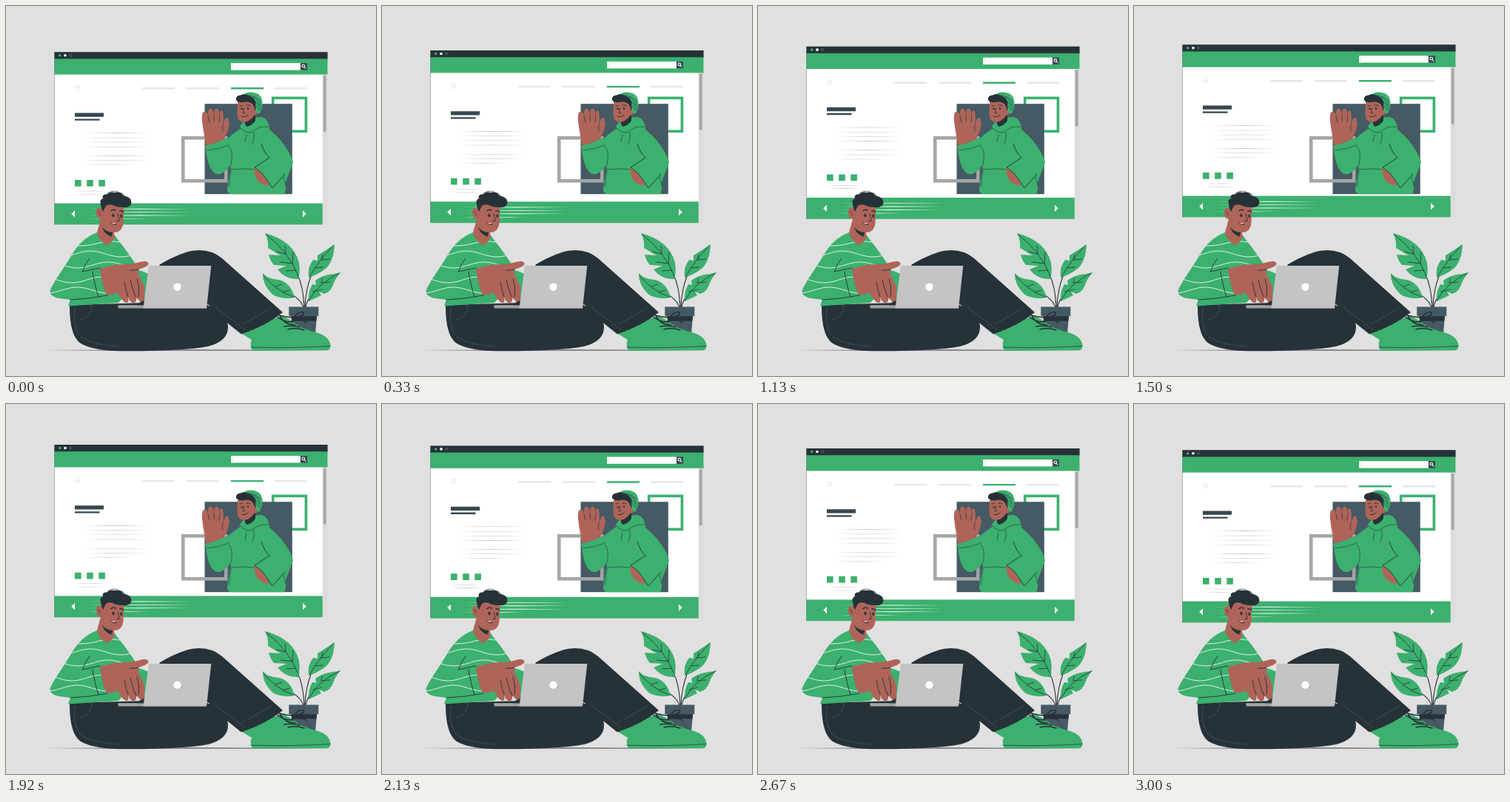
An HTML page that plays this animation: 500x500 px, repeating every 3040 ms.

```html
<!DOCTYPE html>
<html lang="en">
<head>
<meta charset="utf-8">
<title>Browsing</title>
<style>
html, body { margin: 0; width: 100%; height: 100%; overflow: hidden; background: #e0e0e0; }
svg { display: block; width: 100vw; height: 100vh; }
.g { fill: #3cb06e; }
.d { fill: #263238; }
.b { fill: #455a64; }
.s { fill: #ae6459; }
.w { fill: #fff; }
.l { fill: none; stroke: #263238; stroke-linecap: round; stroke-linejoin: round; }
.seam { fill: none; stroke: #455a64; }
</style>
</head>
<body>
<svg viewBox="0 0 500 500" stroke-width=".9">
<defs>
  <clipPath id="shirtClip"><path id="shirt" d="M123 306C108 312 99 320 89 336C81 350 69 366 61 381C57 389 62 393 72 395L87 397L84 405.5L152 401L176 374L174 347L160 327Q152 317 147 310Q135 320 123 306Z"/></clipPath>
</defs>

<g id="page">
  <rect class="d" x="65.3" y="62.2" width="369.3" height="10"/>
  <rect x="427" y="92" width="7.4" height="203" fill="#dcdcdc"/>
  <rect x="428.8" y="94" width="3.8" height="76" rx="1.2" fill="#a6a6a6"/>
  <rect class="w" x="66" y="92" width="361.7" height="175"/>
  <rect class="g" x="65.5" y="71.4" width="369" height="21.2"/>
  <rect class="g" x="65.5" y="266.6" width="362.2" height="28.8"/>
  <path class="l" stroke-width=".5" d="M65.6 72V295" opacity=".6"/>
  <circle class="g" cx="72.7" cy="66.7" r="1.7"/>
  <circle class="w" cx="80" cy="66.7" r="1.8"/>
  <circle cx="87.4" cy="66.7" r="1.5" fill="none" stroke="#63717a" stroke-width=".8"/>
  <rect class="w" x="304" y="77.2" width="94" height="9.4"/>
  <path d="M306.3 79V84.5" stroke="#bbb" stroke-width=".5"/>
  <rect x="398" y="77.2" width="9" height="9.4" fill="#37474f"/>
  <g fill="none" stroke="#fff" stroke-width="1.1"><circle cx="401.8" cy="81" r="1.8"/><path d="M403.2 82.4L405.2 84.5"/></g>
  <path d="M93 107.8H100M93 110.4H100M93 113H100" stroke="#ddd" stroke-width=".7"/>
  <path d="M184 111.3H228M244 111.3H288M363 111.3H407" stroke="#e6e6e6" stroke-width="2.4"/>
  <path d="M304 111.3H348" stroke="#3cb06e" stroke-width="2.4"/>
  <path d="M93 144.5H132V149.7H93ZM93 152.4H126.5V154.8H93Z" fill="#37474f"/>
  <g id="copy" fill="#b8b8b8"></g>
  <path class="g" d="M93 235h8.6v8.8h-8.6zM109.2 235h8.6v8.8h-8.6zM125.3 235h8.6v8.8h-8.6z"/>
  <path class="w" d="M88.2 280.8L93 276.2V285.5ZM405.8 280.8L401 276.2V285.5Z"/>
  <g id="caption" fill="#fff"></g>
</g>

<g id="portrait">
  <rect x="360.7" y="124.3" width="44.7" height="45" fill="none" stroke="#3cb06e" stroke-width="3.6"/>
  <rect class="b" x="268.5" y="132.2" width="118.3" height="122"/>
  <rect x="239.3" y="178.3" width="58" height="58" fill="none" stroke="#a6a6a6" stroke-width="4.6"/>
  <path class="g" d="M318 165C307 172 300 178 297 182L270 191C271 205 274 220 282 226C290 230 298 223 304 214C303 227 299 240 299 250Q301 254 305 254.3H376Q379 250 378 238L388 211C384 196 370 178 356 167Q355 158 347 151L324 153Z"/>
  <path class="s" d="M270 187C269 178 266 167 265.4 158C264 150 265 142 269 142.5Q272 143 273 148Q272 139 276 138.5Q280 138.5 281 147Q281 138 285 138.7Q289 140 288.6 148Q289 140 292 141Q294.5 143 293.5 161Q295 151 299 151Q302 153 301.5 162Q300 171 295 179L296 182L272 190Z"/>
  <path class="l" stroke-width=".7" d="M273 148L275 157M281 147L281.5 156M288.6 148L287.8 157M293.4 160Q291.5 165 293 169"/>
  <path class="g" d="M269 189Q284 186 299 178Q303 184 301 190Q288 195 271 196Z"/>
  <path class="l" d="M272 195Q286 194 301 188" stroke-width=".6"/>
  <path class="g" d="M316 163Q322 150 346 150Q356 154 356 168Q341 177 325 174Q317 170 316 163Z"/>
  <path class="d" d="M322 155L337 147L337 155Q332 162 325 163Q323 160 322 155Z"/>
  <path class="s" d="M313.5 127Q312 143 313 151Q315 157 323 157Q331 155 335 148Q341 147 341 142Q339 138 336 141L335 126Z"/>
  <path class="g" d="M320 121C324 115 338 115 344 122C348 128 347 138 342 146L338 143Q339 133 330 128Z"/>
  <path class="d" d="M311 127Q310 121 317 120.5Q322 118 328 121Q335 123 337.5 130L337 140L333.5 133Q329 128 321 130Q314 131 311 127Z"/>
  <path class="l" stroke-width=".6" d="M327 120Q340 123 344 129M334 123Q342 128 344 134M337 129Q342 132 344 138M338 134L343 141"/>
  <g class="d"><ellipse cx="318.5" cy="139" rx="1.1" ry="1.6"/><ellipse cx="327" cy="138.5" rx="1.1" ry="1.6"/></g>
  <path class="l" d="M316 135L319.5 134.5M325 134Q328 133 330 135M321.5 138L320.5 145L323 145M319 149.5Q323 151 327 147.5"/>
  <path class="l" stroke-width=".6" d="M316 164Q326 174 333 170Q341 162 355 163M325 173L323 184M335 171Q336 180 333 187M301 190Q308 196 304 214M304 221Q320 219 337 221M304 221Q302 234 301 244M372 224Q376 230 378 244"/>
  <path class="s" d="M335 219Q343 220 349 227L357 239L354 243Q342 241 337 231Z"/>
  <path class="g" d="M337 218L359 205L367 197L388 211Q378 232 361 246L345 226Z"/>
  <path class="l" d="M345 186Q349 199 356 205L336 218L347 227L360 246L377 227"/>
</g>

<g id="plant">
  <path class="l" stroke-width="1.1" d="M403 407Q402 380 394 363M404 407Q405 382 413 363M402 407Q397 395 386 390M405 407Q406 398 413 392"/>
  <path class="g" d="M350 307Q369 312 382 323Q402 343 395 369Q378 370 367 356L379 351L362 350Q357 344 355 336L371 337L354 327Q355 317 350 307Z"/>
  <path class="g" d="M444 322Q443 344 433 354Q422 363 409 367Q407 353 415 343L421 344L421 337Q431 331 444 322Z"/>
  <path class="g" d="M347 361Q353 369 369 370Q385 374 390 394Q375 397 362 391Q347 379 347 361Z"/>
  <path class="g" d="M452 360Q445 368 442 377Q439 386 430 389L423 386L426 391Q418 395 409 399Q408 386 414 376L419 377L418 371Q426 365 436 363Q445 362 452 360Z"/>
  <path class="l" stroke-width=".8" d="M352 309Q383 333 395 365M378 335L377 324M387 348L388 333M378 335L365 332M387 348L371 346M391 357L379 358M442 324Q422 345 410 366M426 343L428 336M426 343L437 342M418 354L428 353M348 364Q364 384 388 393M364 379L373 376M374 387L383 384M451 361Q422 374 409 398M426 374L427 368M426 374L438 373M415 386L427 383"/>
  <path class="b" d="M385.5 419H420L418 444H389Z"/>
  <path class="d" d="M385.5 419H420L419.5 425.5H386Z"/>
  <rect class="b" x="382.3" y="406.5" width="40" height="12.7"/>
</g>

<path class="d" d="M50 465.1Q250 464.1 450 465.1Q250 466.1 50 465.1Z"/>

<g id="reader">
  <path class="g" d="M319 443Q347 427 373 419Q384 423 395 432Q406 438 422 442Q438 447 438.5 460Q438 465 433 465.3L333 465.5Q329 458 332 451Z"/>
  <path class="l" stroke-width=".7" d="M331 461Q380 463 438 459.5"/>
  <path class="l" stroke-width="1.5" d="M363 417Q374 428 388 427M370 419Q378 432 391 431M376 433Q386 431 397 434M381 437Q391 434 403 438M386 426Q393 412 402 414Q405 418 390 421Q379 421 366 417M388 425Q402 423 406 428"/>
  <path class="d" d="M207 350C222 341 243 330 261 330Q279 330 292 341L374 414Q352 432 318 443.5L270 405L240 385Z"/>
  <path class="d" d="M86 404L190 401L272 405Q300 417 300 434Q300 453 273 460Q240 466 168 466.3Q119 467 101 456C87 446 86 420 86 404Z"/>
  <path class="seam" stroke-width=".7" d="M93 408Q90 440 104 449Q118 458 153 460M116 404Q116 420 100 424M280 405Q302 421 324 438M318 431L357 409"/>
  <path class="d" d="M269 402L283 405L273 408Z"/>
  <path d="M271 403L275 405" stroke="#fff"/>
  <use href="#shirt" class="g"/>
  <g clip-path="url(#shirtClip)" fill="none" stroke="#fff" stroke-width=".8" id="waves"></g>
  <path class="l" d="M113 341Q106 350 103 359L127 354M117 359Q120 378 125 393M87 397Q112 396 137 391"/>
  <path class="s" d="M127 273Q121 272 122 281Q123 288 128 288L123 306Q126 318 136 323Q143 321 147 312L146 306Q157 306 158.5 293L159.5 270L150 264L133 265Z"/>
  <path class="d" d="M130 299Q136 306 144 306L143 311.5Q133 309 130 299Z"/>
  <path class="d" d="M128 268Q126 262 131 260Q129 254 137 254.5Q140 250 147 252Q155 250 159 256.5Q170 258 169.5 266Q168 273 159 272Q149 272 143 268.5Q136 267 134 272L131 278Q129 274 128 268Z"/>
  <path class="l" stroke-width=".7" d="M136 255Q141 248 151 251M151 253Q159 251 161 258M124 278Q127 277 127 283"/>
  <g class="d"><ellipse cx="145" cy="283" rx="1.6" ry="2.3"/><ellipse cx="155.8" cy="283.8" rx="1.4" ry="2.2"/></g>
  <path class="l" stroke-width="1.5" d="M142 276.5Q145 274.5 148 276M154 277Q157 276 158.5 278.5"/>
  <path class="l" d="M151.3 281L153 290.3L149.5 290.5M142 293Q145 297 149 295.6"/>
  <path class="w" d="M142.6 293Q145 294 147.5 293Q146 296 142.6 293Z"/>
  <path d="M151 404.2H188V408.3H152Z" fill="#a6a6a6"/>
  <path class="d" d="M177 404.2H188V394Z"/>
  <path class="g" d="M176 357Q185 358 192 362L188 395L181 378Z"/>
  <path class="s" d="M127 355Q145 349 160 349Q172 349 181 346Q191 343 192.5 348Q193 352 179 356Q184 362 187 376L187 397Q183 402 179 397L176 394Q177 401 172 401.5Q168 401 165 393Q167 402 162 401Q157 399 151 388L136 391Q129 375 127 355Z"/>
  <path class="l" d="M160 373Q162 384 165 393M168 370Q171 384 176 394M177 369Q181 381 179 393M179 356Q172 358 167 357"/>
  <path class="g" d="M178 357Q186 358 192 363L189 380Q181 371 178 357Z"/>
  <path d="M193 351H277.3L271 408.8H185.5Z" fill="#c4c4c4"/>
  <path d="M151 408.2H271" stroke="#8f8f8f" stroke-width=".6"/>
  <circle class="w" cx="231.5" cy="379.6" r="5.2"/>
</g>
</svg>

<script>
const $ = id => document.getElementById(id);

// Thin line that tapers to a point at both ends
const taper = (x1, x2, y, h) => {
  const m = (x1 + x2) / 2;
  return `<path d="M${x1} ${y}Q${m} ${y - h} ${x2} ${y}Q${m} ${y + h} ${x1} ${y}Z"/>`;
};

$('copy').innerHTML = [
  [105, 194, 171.6], [105, 194, 178], [105, 194, 184], [105, 194, 190.2],
  [105, 194, 202.4], [105, 194, 208.5], [105, 170, 214.5],
  [92, 138, 250], [95, 135, 254.2]
].map(([a, b, y]) => taper(a, b, y, .6)).join('');

$('caption').innerHTML = [[252, 274.2], [252, 278.6], [250, 283], [193, 287.6]]
  .map(([x, y]) => taper(110, x, y, .9)).join('');

const wave = (y, amp, phase) => {
  let d = '';
  for (let x = 55; x <= 195; x += 4)
    d += `${d ? 'L' : 'M'}${x} ${(y + amp * Math.sin(x / 13 + phase)).toFixed(1)}`;
  return `<path d="${d}"/>`;
};
$('waves').innerHTML = [[321, 3, 0], [335, 4, 2.2], [350, 4, .4], [370, 4, 1],
  [384, 4, 3.6]].map(w => wave(...w)).join('');

const LOOP = 3040, FLOAT = 3000, LIFT = 10;
const start = performance.now();

function draw(now) {
  const t = Math.min(Math.max(0, now - start) % LOOP, FLOAT) / FLOAT;
  const y = -LIFT * (1 - Math.abs(1 - 2 * t));
  $('page').setAttribute('transform', `translate(0 ${y.toFixed(3)})`);
  requestAnimationFrame(draw);
}
draw(start);
</script>
</body>
</html>
```
